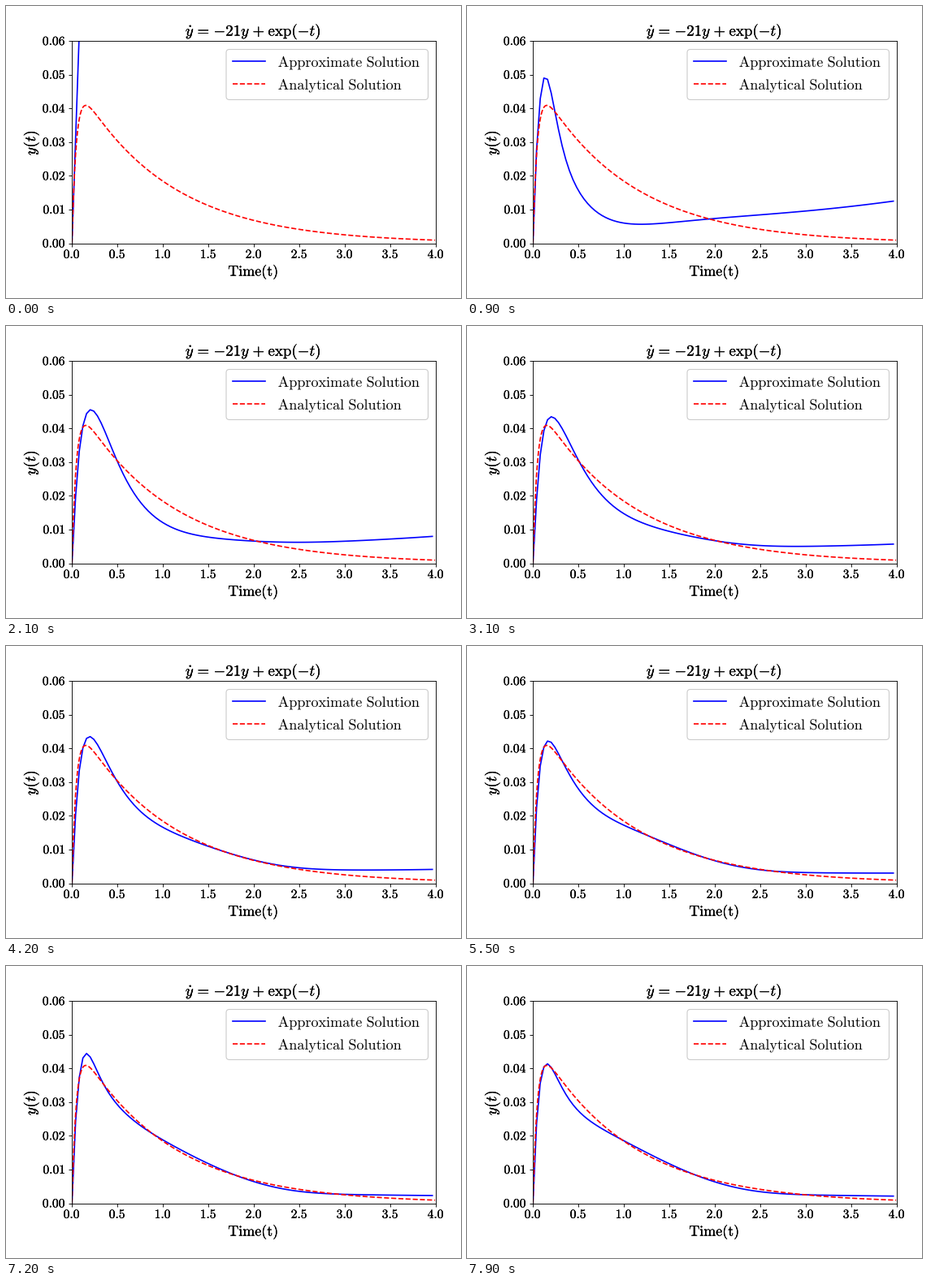
Recreate the animation shown at these times as a matplotlib script. Size 560 by 360 pixels, loop 8 s.

```python
import numpy as np
import matplotlib.pyplot as plt
from matplotlib.animation import FuncAnimation
from matplotlib.lines import Line2D
from matplotlib.patches import FancyBboxPatch
from matplotlib.patheffects import Normal

plt.rcParams["mathtext.fontset"] = "cm"

W, H, DPI = 560, 360, 80
FRAMES, STEP_MS = 80, 100
LEFT, RIGHT, TOP, BOTTOM = 81.2, 529.2, 43.1, 292.5
WARMUP = 9  # steps until the first rough fit

t = np.arange(100) * 0.04


def exact(t):
    return (np.exp(-t) - np.exp(-21 * t)) / 20


def pulse(center, k):
    """Bump that starts at 0, peaks at 1 in center and decays; k sharpens it."""
    x = t / center
    return (x * np.exp(1 - x)) ** k


def error(n):
    """Error of the approximation after n training steps."""
    m = max(n - WARMUP, 0)
    s = m / (FRAMES - 1 - WARMUP)
    swing = np.sin(np.pi * np.sqrt(s)) ** 2
    wobble = 14 * s * np.cos(2 * np.pi * (n - 72) / 4.85)

    peak = 30 + 106 * np.exp(-m / 14) + wobble
    trough = 22 + 143 * np.exp(-m / 12) - 0.7 * wobble
    sharp = 4 - 2.4 * np.exp(-m / 8)
    fade = np.exp(-m / 22)

    e = peak * pulse(0.15 + 0.13 * swing, 3)
    e -= trough * pulse(0.45 + 0.2 * (1 - s) + 0.38 * swing, sharp)
    e -= (70 * swing + 30 * s) * pulse(0.04, 1)
    e += (8 + 110 * fade) * (t / 4) ** 1.5
    e += 14 * (1 - fade) * (0.5 * pulse(1.2, 12) - pulse(2.4, 20))
    return e * 1e-4


def approx(n):
    y = exact(t) + error(n)
    start = max(1 - n / WARMUP, 0) ** 6
    return y + (0.78 * t - y) * start


fig = plt.figure(figsize=(W / DPI, H / DPI), dpi=DPI, facecolor="white")
ax = fig.add_axes([LEFT / W, 1 - BOTTOM / H,
                   (RIGHT - LEFT) / W, (BOTTOM - TOP) / H])
ax.set(xlim=(0, 4), ylim=(0, 0.06),
       xticks=np.arange(0, 4.1, 0.5), yticks=np.arange(0, 0.061, 0.01))
ax.tick_params(labelbottom=False, labelleft=False)


def label(x, y, s, size, ha="center", copies=3, **kw):
    """Text at pixel (x, y) on its baseline; copies thicken the edges."""
    fig.text(x / W, 1 - y / H, f"${s}$", size=size, ha=ha, va="baseline",
             path_effects=[Normal()] * copies, **kw)


for i in range(9):
    label(LEFT + i * 56, 310.8, rf"\mathrm{{{i / 2:.1f}}}", 14)
for i in range(7):
    y = BOTTOM - i * (BOTTOM - TOP) / 6
    label(73.8, y + 5, rf"\mathrm{{{i / 100:.2f}}}", 14, "right")
label(304.3, 36.5, r"\dot{y}\hspace{0.12}=\hspace{0.12}{-}21y"
      r"\hspace{0.1}+\hspace{0.06}\exp({-}t)", 17.05)
label(304.3, 332.5, r"\mathrm{Time(t)}", 16.2)
label(36, 168.5, "y(t)", 17.05, rotation=90, rotation_mode="anchor")

# Legend
fig.add_artist(FancyBboxPatch(
    (271, H - 115.5), 248.5, 62, boxstyle="round,pad=0,rounding_size=4",
    fc="white", ec="0.8", lw=1, transform=None))
for y, name, color, style in ((68, "Approximate", "blue", "-"),
                              (96, "Analytical", "red", "--")):
    fig.add_artist(Line2D([279.2, 319.2], [H - y] * 2, color=color,
                          ls=style, lw=1.5, transform=None))
    label(334.7, y + 7, rf"\mathrm{{{name}\ Solution}}", 16.3, "left", copies=1)

line, = ax.plot([], [], color="blue", lw=1.5)
fine = np.arange(0, 4, 0.01)
ax.plot(fine, exact(fine), color="red", ls="--", lw=1.5)


def update(n):
    line.set_data(t, approx(n))
    return line,


anim = FuncAnimation(fig, update, frames=FRAMES, interval=STEP_MS,
                     init_func=lambda: update(0), repeat=True, repeat_delay=0)
plt.show()
```
